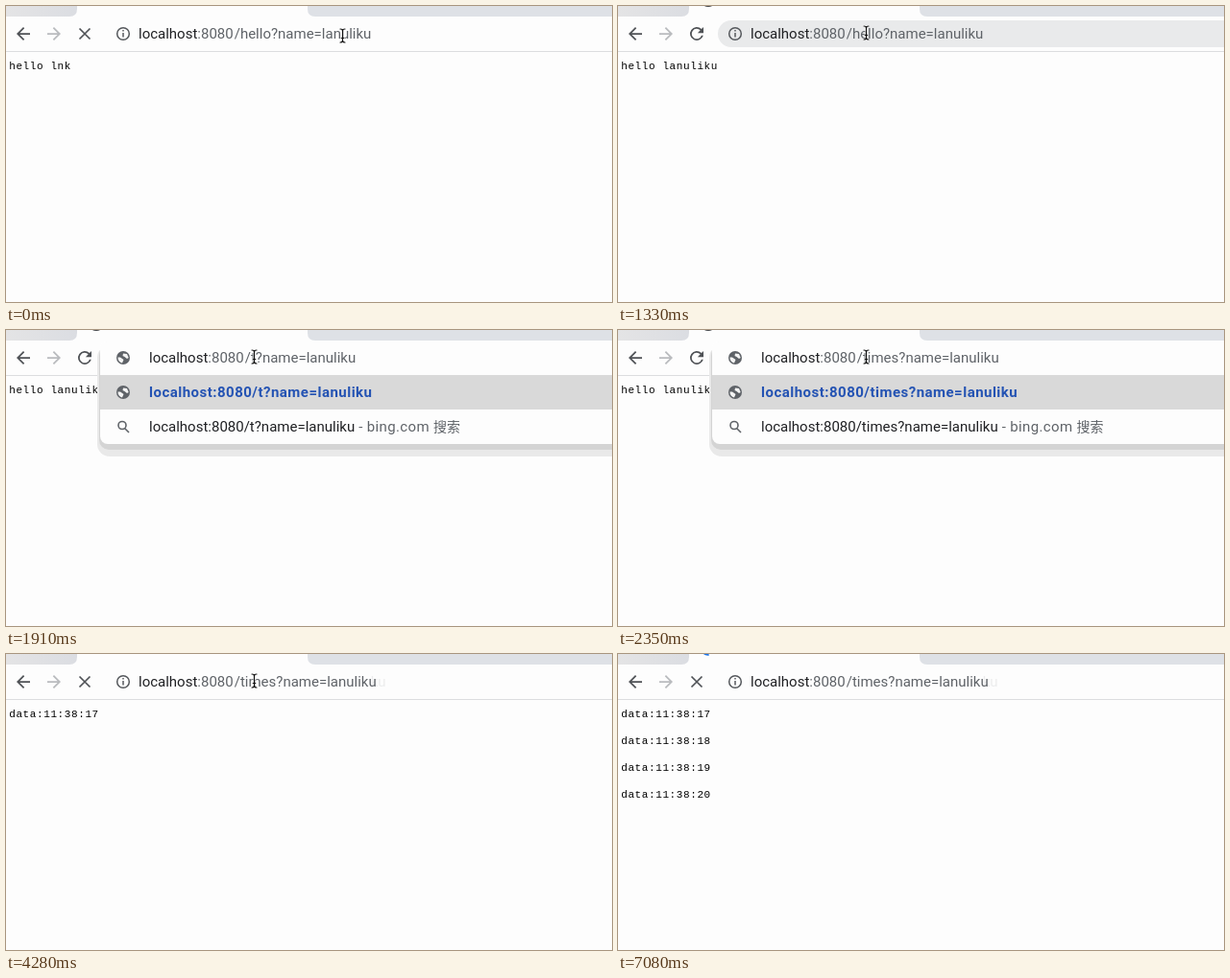
An HTML page that plays this animation: 631 px wide and 309 px high, repeating every 7.18 s.

```html
<!DOCTYPE html>
<html lang="zh">
<head>
<meta charset="utf-8">
<title>Browser demo</title>
<style>
  html, body { margin: 0; width: 100%; height: 100%; overflow: hidden; background: #fdfdfd; }
  svg { display: block; }
  text { white-space: pre; }
  .ui { font: 15px Roboto, "Noto Sans CJK SC", "Noto Sans CJK", sans-serif; fill: #5f6368; }
  .dark { fill: #202124; }
  .bold { font-weight: 700; fill: #2453b3; letter-spacing: .48px; }
  .engine { letter-spacing: .35px; }
  .page { font: 11px "Liberation Mono", "Courier New", monospace; letter-spacing: .6px; fill: #000; }
</style>
</head>
<body>
<svg width="631" height="309" viewBox="0 0 631 309">
  <defs>
    <linearGradient id="tabShade">
      <stop offset="0" stop-color="#e4e4e5"/>
      <stop offset="1" stop-color="#dbdde2"/>
    </linearGradient>
    <path id="arrow" d="M20 11H7.83l5.59-5.59L12 4l-8 8 8 8 1.41-1.41L7.83 13H20z"/>
    <g id="globe">
      <circle r="7" fill="#5f6368"/>
      <path d="M-5.6 -.5H-3L.5 2L-1 5.5Q-5.2 4.6 -5.6 -.5zM0 -4.5L4 -4L5.7 0L4 1L1.5 -1L-.5 -2z" fill="#f4f4f4"/>
    </g>
    <path id="beamShape" d="M-2.5 -7Q0 -7 0 -5Q0 -7 2.5 -7M0 -6V6M-2.5 7Q0 7 0 5Q0 7 2.5 7M-1.3 2.5H1.3"/>
  </defs>

  <rect width="631" height="309" fill="#fdfdfd"/>

  <!-- tab strip -->
  <path d="M0 0H74V3Q74 11 66 11H0z" fill="url(#tabShade)"/>
  <path d="M314 0H631V11H322Q314 11 314 3z" fill="#dee1e6"/>
  <path id="favicon" d="M88.5 -2.6A7 7 0 0 0 99.5 -2.6" fill="none" stroke="#45484c" stroke-width="2"/>
  <path id="spinner" fill="none" stroke-width="2"/>

  <!-- toolbar -->
  <rect y="47" width="631" height="1" fill="#dcdddf"/>
  <use href="#arrow" transform="translate(7.5 18.5) scale(.875)" fill="#4f5256"/>
  <use href="#arrow" transform="translate(60.5 18.5) scale(-.875 .875)" fill="#b9bbbe"/>
  <path id="stop" d="M76.5 23.5l11 11m0 -11l-11 11" stroke="#4f5256" stroke-width="1.7"/>
  <path id="reload" transform="translate(71.5 18.5) scale(.875)" fill="#4f5256"
    d="M17.65 6.35A8 8 0 1 0 19.73 14h-2.08A6 6 0 1 1 16.22 7.78L13 11h7V4z"/>
  <rect id="pill" x="104" y="15" width="560" height="28" rx="14"/>
  <g id="info" fill="none" stroke="#55585c" stroke-width="1.5">
    <circle cx="122" cy="29" r="6.3"/>
    <path d="M122 28v4.5M122 25v1.6"/>
  </g>

  <!-- page -->
  <g id="page" class="page"></g>

  <!-- suggestions -->
  <g id="drop">
    <rect x="95" y="16" width="560" height="116" rx="13" fill="#e9e9e9"/>
    <rect x="97" y="16" width="560" height="109" rx="10" fill="#d4d4d4"/>
    <rect x="98" y="12" width="560" height="107" rx="8" fill="#fdfdfd"/>
    <rect x="98" y="47" width="533" height="36" fill="#d9d9d9"/>
    <use href="#globe" x="122" y="29"/>
    <use href="#globe" x="122" y="65"/>
    <path d="M124 103l4 4M125 99.5a4 4 0 1 0 -8 0a4 4 0 1 0 8 0" fill="none" stroke="#5f6368" stroke-width="1.6"/>
    <text id="best" class="ui bold" x="149" y="70"></text>
    <text class="ui" x="149" y="106"><tspan id="query" class="dark"></tspan><tspan class="engine"> - bing.com </tspan><tspan font-size="14">搜索</tspan></text>
  </g>

  <rect id="selection" x="244.5" y="20" width="32.5" height="18" fill="#b0d5fb"/>
  <text id="url" class="ui" y="34"><tspan class="dark">localhost</tspan><tspan>:8080</tspan><tspan dx="1">/</tspan><tspan id="route"></tspan><tspan id="param"></tspan></text>
  <text id="ghost" class="ui" x="395.5" y="34" text-anchor="end" opacity=".1"></text>

  <!-- pointers -->
  <g id="beam" fill="none" stroke-linecap="round">
    <use href="#beamShape" stroke="#fff" stroke-width="2.6" opacity=".7"/>
    <use href="#beamShape" stroke="#111" stroke-width="1.2"/>
  </g>
  <path id="pointer" d="M0 0V14.5L3.3 11.4L5.5 16.5L7.8 15.5L5.7 10.5H10.3z" fill="#000" stroke="#fff"/>
</svg>
<script>
const LOOP = 7180, STEP = 147.5;
const NAME = 'lanuliku', PARAM = '?name=' + NAME;
const $ = id => document.getElementById(id);
const show = (id, on) => $(id).setAttribute('display', on ? 'inline' : 'none');
const put = (id, s) => { if ($(id).textContent !== s) $(id).textContent = s; };
const within = (t, a, b) => t >= a && t < b;

// latest entry whose start time has passed
const at = (list, t) => list.filter(e => e[0] <= t).pop();

const CURSOR = [
  [0, 350.5, 31], [590, 347.5, 31], [740, 333, 31], [880, 306.5, 31], [1030, 280.5, 30],
  [1180, 264.5, 29], [1330, 258.5, 28], [5010, 262, 36], [5160, 290, 82],
  [5310, 360, 150], [5460, 470, 228], [5600, 562, 285], [5750, 592, 330]
];
const ROUTES = [[0, 'hello'], [1910, 't'], [2060, 'ti'], [2200, 'time'], [2350, 'times']];
const TICKS = [3840, 4870, 5750, 6780];
// start, end, waiting for the first byte
const SPINS = [[3100, 3400, true], [3840, 4280], [4430, 5600], [6200, LOOP]];

function pageLines(t) {
  if (t < 140) return ['hello lnk'];
  if (t < TICKS[0]) return ['hello ' + NAME];
  return TICKS.filter(s => s <= t).map((s, i) => 'data:11:38:' + (17 + i));
}

function drawPage(t) {
  const lines = pageLines(t), key = lines.join();
  if ($('page').dataset.key === key) return;
  $('page').dataset.key = key;
  $('page').innerHTML = lines.map((s, i) => `<text x="3.2" y="${66 + 28 * i}">${s}</text>`).join('');
}

function drawSpinner(t) {
  const spin = SPINS.find(([a, b]) => within(t, a, b));
  show('spinner', spin);
  if (!spin) return;
  const [a, b, waiting] = spin;
  const now = Math.max(a, Math.floor((t + 10) / STEP) * STEP);
  const u = (now - a) / (b - a);
  const dir = waiting ? -1 : 1;
  const point = deg => {
    const r = deg * Math.PI / 180;
    return `${94 + dir * 7 * Math.cos(r)} ${-6.2 + 7 * Math.sin(r)}`;
  };
  const tail = 40 + 50 * u, head = Math.min(150, 80 + 240 * u);
  $('spinner').setAttribute('d', `M${point(tail)}A7 7 0 0 ${waiting ? 0 : 1} ${point(head)}`);
  $('spinner').setAttribute('stroke', waiting ? '#80868b' : '#1a73e8');
}

function render(t) {
  const loading = t < 140 || t >= 2650;
  const typing = within(t, 1910, 2650);
  const focus = within(t, 1470, 1910);
  const hover = within(t, 590, 1470);
  const selected = within(t, 1620, 1910);
  const route = at(ROUTES, t)[1];

  show('stop', loading);
  show('reload', !loading);
  show('favicon', !loading);
  show('info', !typing);
  show('drop', typing);
  show('pill', hover || focus);
  $('pill').setAttribute('fill', focus ? '#fdfdfd' : '#e9eaeb');
  $('pill').setAttribute('stroke', focus ? '#a3cffa' : 'none');
  $('pill').setAttribute('stroke-width', 2);

  show('selection', selected);
  $('route').setAttribute('class', selected ? 'dark' : '');
  $('url').setAttribute('x', typing ? 149 : 138);
  put('route', route);
  put('param', PARAM);
  put('best', 'localhost:8080/' + route + PARAM);
  put('query', 'localhost:8080/' + route + PARAM);
  put('ghost', NAME.slice(-2));
  show('ghost', t >= 2650);

  drawPage(t);
  drawSpinner(t);

  const [, x, y] = at(CURSOR, t);
  for (const id of ['beam', 'pointer']) $(id).setAttribute('transform', `translate(${x} ${y})`);
  show('beam', y < 44);
  show('pointer', y >= 44);
}

const start = performance.now();
function frame() {
  render((performance.now() - start) % LOOP);
  requestAnimationFrame(frame);
}
frame();
</script>
</body>
</html>
```
